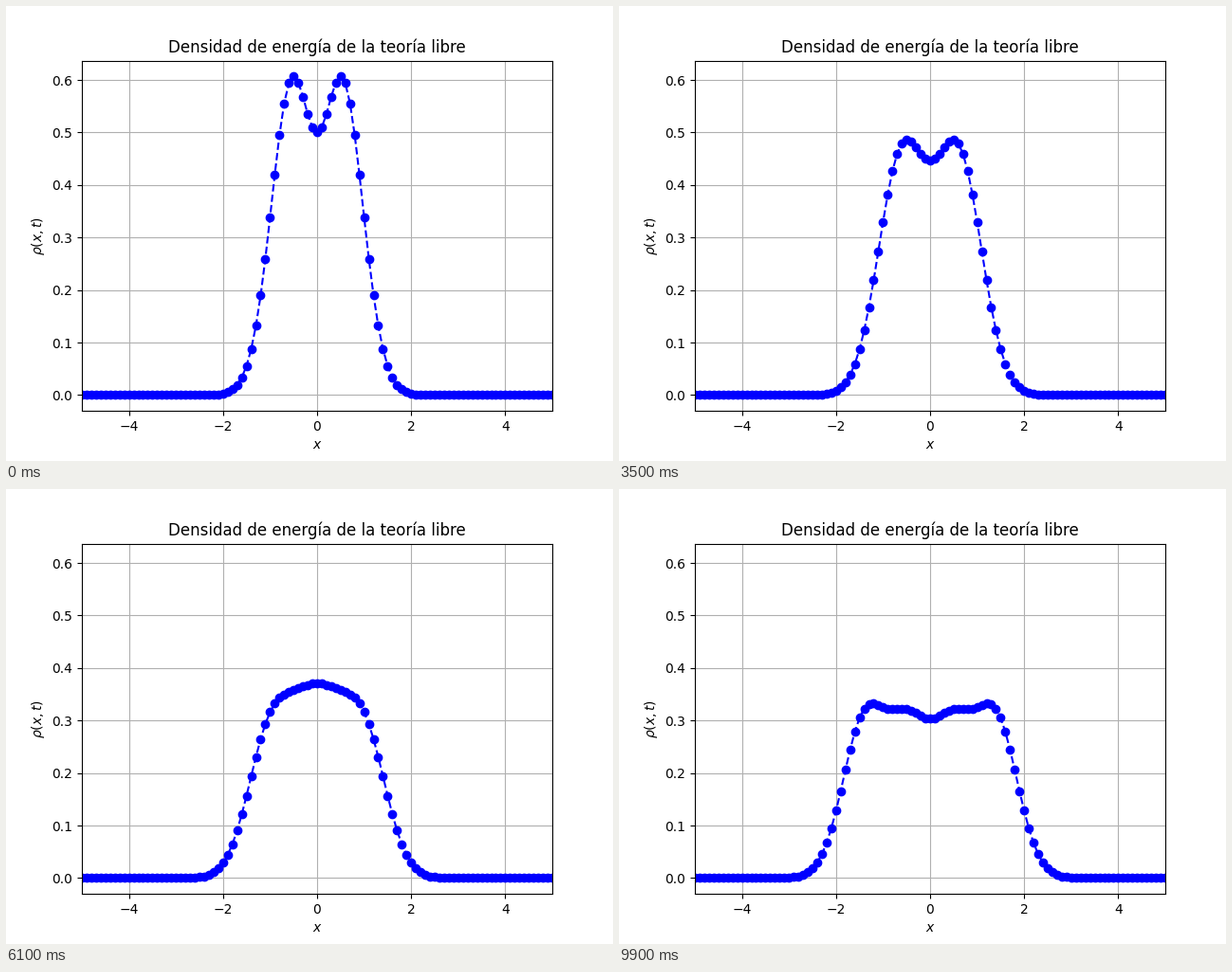
These frames come from a looping animation (640x480 px, 10 s). A matplotlib script:

```python
import numpy as np
import matplotlib.pyplot as plt
from matplotlib.animation import FuncAnimation

FRAMES = 100
DT = 0.01
DX = 0.1

x = np.linspace(-5, 5, 101)

# Fourier modes of the initial profile exp(-x^2)
dk = 0.1
k = np.arange(0, 20, dk)
amp = np.exp(-k**2 / 4) * dk / np.sqrt(np.pi)
amp[0] /= 2
cos_kx = np.cos(np.outer(x, k))
sin_kx = np.sin(np.outer(x, k))

# Lattice dispersion relation; the longest waves grow instead of oscillating
k_lat = 2 / DX * np.sin(k * DX / 2)
omega = np.sqrt(k_lat**2 - 1 + 0j)


def density(t):
    a = amp * np.cos(omega * t).real
    phi = cos_kx @ a
    dphi = -sin_kx @ (k * a)
    return 0.5 * (dphi**2 + phi**2)


fig, ax = plt.subplots(figsize=(6.4, 4.8), dpi=100)
line, = ax.plot(x, density(0), "bo--")
ax.set_xlim(-5, 5)
ax.set_title("Densidad de energía de la teoría libre")
ax.set_xlabel(r"$x$")
ax.set_ylabel(r"$\rho(x,t)$")
ax.grid(True)
ax.set_ylim(ax.get_ylim())


def update(i):
    line.set_ydata(density(i * DT))
    return line,


anim = FuncAnimation(fig, update, frames=FRAMES, interval=100, repeat=True)
plt.show()
```
